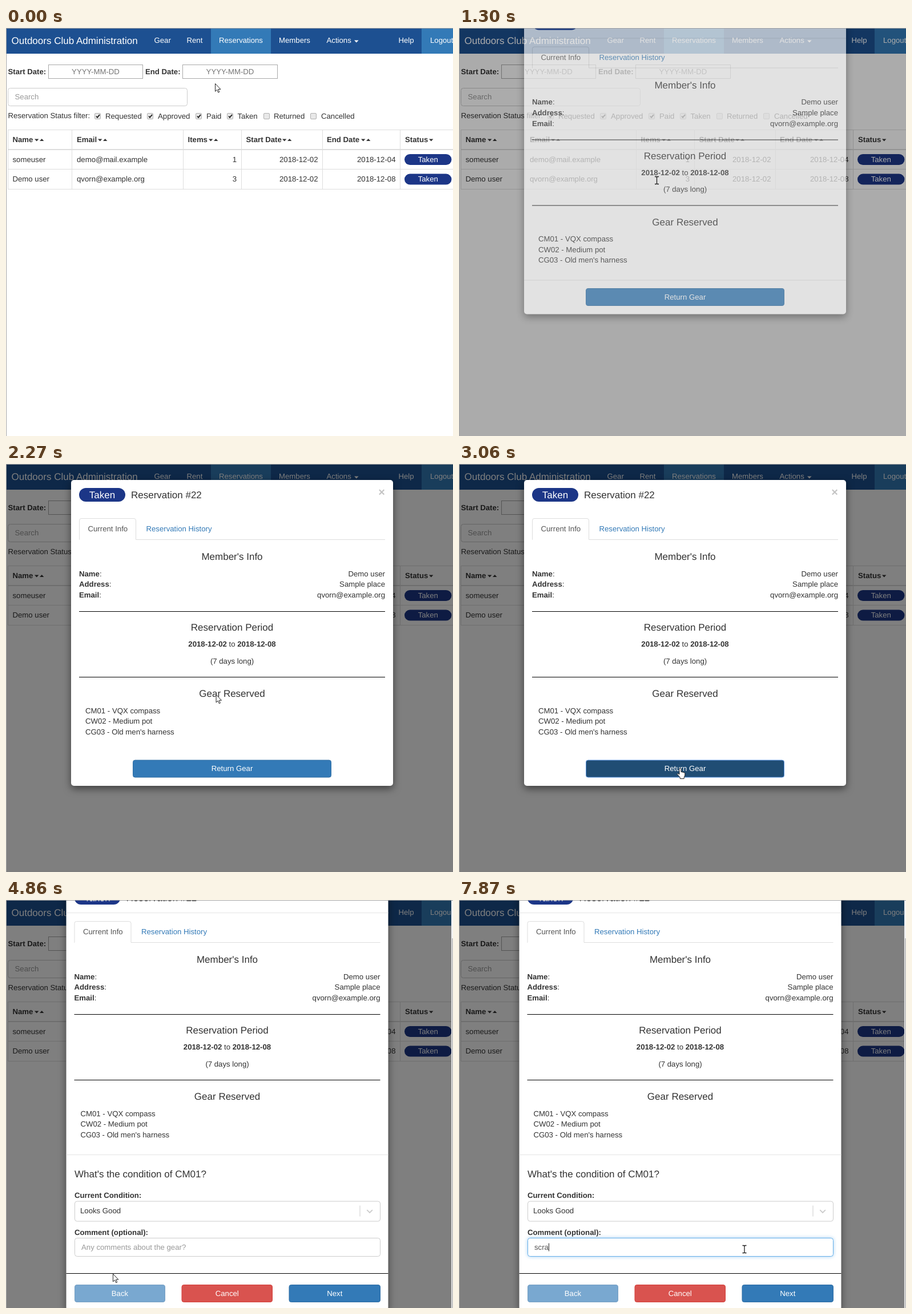
Write an HTML page that moves like this. It is 783 px wide and 715 px high and loops after 8000 ms.

```html
<!DOCTYPE html>
<html lang="en">
<head>
<meta charset="utf-8">
<title>Reservations</title>
<style>
html, body { margin: 0; width: 100%; height: 100%; overflow: hidden; background: #fff; }
svg { display: block; width: 783px; height: 715px; }
text { font: 13.2px "Liberation Sans", Arial, sans-serif; fill: #333; text-rendering: geometricPrecision; white-space: pre; }
.b { font-weight: bold; }
.m { text-anchor: middle; }
.e { text-anchor: end; }
.big { font-size: 17px; }
.w { fill: #fff; }
.hint { fill: #999; }
.date { fill: #757575; }
.tab { fill: #555; }
.link { fill: #337ab7; }
.x { font-size: 20px; font-weight: bold; fill: #c4c4c4; }
.pill { fill: #1c3687; }
.sheet { fill: #fff; filter: drop-shadow(0 5px 7px rgba(0,0,0,.5)); }
.focus { stroke: #66afe9; filter: drop-shadow(0 0 3px rgba(102,175,233,.6)); }
</style>
</head>
<body>
<svg id="stage" viewBox="0 0 783 715"></svg>
<script>
const text = (x, y, s, cls = '') => `<text x="${x}" y="${y}" class="${cls}">${s}</text>`;
const box = (x, y, w, h, fill, extra = '') =>
  `<rect x="${x}" y="${y}" width="${w}" height="${h}" fill="${fill}" ${extra}/>`;
const field = (x, y, w, h, stroke, r = 0, extra = '', fill = '#fff') =>
  box(x, y, w, h, fill, `stroke="${stroke}" rx="${r}" ${extra}`);
const path = (d, stroke, extra = '') => `<path d="${d}" fill="none" stroke="${stroke}" ${extra}/>`;
const button = (id, x, y, w, fill, edge, label, extra = '') =>
  `<g ${extra}>${box(x + .5, y + .5, w - 1, 30, fill, `stroke="${edge}" rx="3.5" id="${id}"`)}` +
  text(x + w / 2, y + 19.6, label, 'w m') + '</g>';
const down = (x, y) => `<path d="M${x} ${y}h7.4l-3.7 3.9z" fill="#333"/>`;
const up = (x, y) => `<path d="M${x} ${y + 3.9}h7.4l-3.7-3.9z" fill="#333"/>`;
const pill = (x, y, w, h, base, cls) =>
  box(x, y, w, h, '', `rx="${h / 2}" class="pill"`) + text(x + w / 2, base, 'Taken', 'w m ' + cls);

function navbar() {
  const items = [[259.5, 'Gear'], [316.5, 'Rent'], [373, 'Reservations'], [478, 'Members'],
    [561.5, 'Actions'], [687.5, 'Help'], [743, 'Logout']];
  return box(0, 0, 783, 45, '#1d5091') + box(359, 0, 105, 45, '#337ab7') + box(728, 0, 55, 45, '#337ab7') +
    text(9.5, 27.5, 'Outdoors Club Administration', 'w big') +
    items.map(([x, s]) => text(x, 26, s, 'w')).join('') +
    '<path d="M610 21.5h7.6l-3.8 3.9z" fill="#fff"/>';
}

function filters() {
  const boxes = [[155, 'Requested', 174], [247, 'Approved', 266], [332, 'Paid', 351],
    [387, 'Taken', 405.5], [451, 'Returned', 469], [533, 'Cancelled', 552]];
  return text(3.5, 80.5, 'Start Date:', 'b') + field(74.5, 64.5, 165, 24, '#a9a9a9') + text(157, 80.5, 'YYYY-MM-DD', 'm date') +
    text(244, 80.5, 'End Date:', 'b') + field(309.5, 64.5, 166, 24, '#a9a9a9') + text(392.5, 80.5, 'YYYY-MM-DD', 'm date') +
    field(3.5, 105.5, 314, 31, '#ccc', 4) + text(15.5, 125, 'Search', 'hint') +
    text(3.5, 157.5, 'Reservation Status filter:') +
    boxes.map(([x, s, tx], i) => field(x + .5, 149.5, 10, 10, '#b0b0b0', 1.5, '', '#e8e8e8') +
      (i < 4 ? path(`M${x + 3} 154.5l2 2.3 4-5`, '#222', 'stroke-width="1.9"') : '') + text(tx, 158.5, s)).join('');
}

function table() {
  const heads = [[11.5, 'Name', 50], [124, 'Email', 161], [318.5, 'Items', 355],
    [420.5, 'Start Date', 484], [562, 'End Date', 622], [699, 'Status', 741]];
  const rows = [['someuser', 'demo@mail.example', 1, '2018-12-04'], ['Demo user', 'qvorn@example.org', 3, '2018-12-08']];
  return path('M3.5 282.5V178.5H783M3.5 247.5H783M3.5 282.5H783M115.5 178V282M310.5 178V282M412.5 178V282M554.5 178V282M690.5 178V282', '#ddd') +
    path('M3 213H783', '#ddd', 'stroke-width="2"') +
    heads.map(([x, s, c]) => text(x, 199.6, s, 'b') + down(c, 194.5) + (c < 700 ? up(c + 9, 194) : '')).join('') +
    rows.map(([name, mail, n, end], i) => {
      const y = 234.7 + i * 34.6;
      return text(11.5, y, name) + text(124, y, mail) + text(404, y, n, 'e') + text(546.5, y, '2018-12-02', 'e') +
        text(682.5, y, end, 'e') + pill(698, y - 13.7, 82.5, 19, y, '');
    }).join('');
}

function details() {
  const info = [['Name', 'Demo user'], ['Address', 'Sample place'], ['Email', 'qvorn@example.org']];
  const gear = ['CM01 - VQX compass', 'CW02 - Medium pot', "CG03 - Old men's harness"];
  return pill(128, 42, 81, 24, 59.8, 'big') + text(219, 59.8, 'Reservation #22', 'big') + text(658, 56, '×', 'x m') +
    path('M128 132.5h.5V99q0-3.5 3.5-3.5h92q3.5 0 3.5 3.5v33.5H664', '#ddd') +
    text(143.5, 118, 'Current Info', 'tab') + text(245.5, 118, 'Reservation History', 'link') +
    text(396, 168.3, "Member's Info", 'big m') +
    info.map(([k, v], i) => text(128, 196.8 + i * 18.6, `<tspan class="b">${k}</tspan>:`) +
      text(664, 196.8 + i * 18.6, v, 'e')).join('') +
    path('M128 258.5H664M128 373.5H664', '#000') +
    text(396, 292.4, 'Reservation Period', 'big m') +
    text(396, 320, '<tspan class="b">2018-12-02</tspan> to <tspan class="b">2018-12-08</tspan>', 'm') +
    text(396, 349.5, '(7 days long)', 'm') + text(396, 408, 'Gear Reserved', 'big m') +
    gear.map((s, i) => text(139, 436.8 + i * 18.5, s)).join('');
}

function survey() {
  return text(128.5, 543.5, "What's the condition of CM01?", 'big') +
    text(128.5, 580.3, 'Current Condition:', 'b') + field(129, 586, 535, 35, '#ccc', 4) + text(138.5, 607.2, 'Looks Good') +
    path('M628.5 593.5v19', '#ccc') + path('M640.8 601.2l4.8 4.8 4.8-4.8', '#ccc', 'stroke-width="1.9"') +
    text(128.5, 644.5, 'Comment (optional):', 'b') + field(129, 650.5, 535, 32, '#ccc', 4, 'id="comment"') +
    '<text id="typed" x="140.5" y="670.6"></text>' + box(0, 659.5, 1, 14, '#222', 'id="caret"') +
    path('M114 712.5H678', '#000') +
    button('back', 128.5, 732, 159, '#337ab7', '#2e6da4', 'Back', 'opacity=".65"') +
    button('cancel', 316, 732, 159.5, '#d9534f', '#d43f3a', 'Cancel') +
    button('next', 504, 732, 160.5, '#337ab7', '#2e6da4', 'Next');
}

const pointers = `
  <path id="arrow" d="M.5.5v13.6l3.1-2.9 2.2 4.8 2-.9-2.1-4.7h4.2z" fill="#fff" stroke="#222"/>
  <g id="beam">${path('M-3.5-6.5h2.5l1 1 1-1h2.5M0-5.5V5.5M-3.5 6.5h2.5l1-1 1 1h2.5', '#222', 'stroke-width="1.3"')}</g>
  <path id="hand" d="M-1.5 1q1.5-2 3 0v5.5l5 1q2 .6 2 2.5-.2 4-1.8 6v2.5h-7V16q-2-2-5-5.5.5-2.3 3.8.5z" fill="#fff" stroke="#222"/>`;

document.getElementById('stage').innerHTML =
  navbar() + filters() + table() +
  box(0, 0, 783, 715, '#000', 'id="shade"') +
  `<g id="modal">${box(114, 28, 564, 536, '', 'rx="5" class="sheet" id="sheet"')}${details()}
    ${path('M114 80.5H678M114 504.5H678', '#e5e5e5', 'id="rules"')}
    <g id="foot">${button('give', 222, 518.5, 348, '#337ab7', '#2e6da4', 'Return Gear')}</g>
    <g id="survey">${survey()}</g></g>` +
  `<g id="bar">${box(780, 0, 3, 715, '#f1f1f1')}${box(781, 0, 2, 666, '#c1c1c1', 'id="thumb"')}</g>` +
  path('M0 .5H783M.5 0V715', '#a6a6a6') + `<g id="pointer">${pointers}</g>`;

const el = {};
document.querySelectorAll('[id]').forEach(n => { el[n.id] = n; });
const show = (n, on) => n.setAttribute('visibility', on ? 'inherit' : 'hidden');
const set = (n, o) => { for (const k in o) n.setAttribute(k, o[k]); };

// last entry whose time has passed
const at = (list, t) => list.filter(k => k[0] <= t).pop();

const OPENING = [[0, 0, -134], [1300, .66, -62.5], [1420, 1, -7.5], [1580, 1, 0]];
const SCROLL = [[0, 0], [4040, 3.5], [4170, 40], [4310, 58]];
const TYPING = [[0, ''], [7060, 's'], [7590, 'sc'], [7870, 'scra']];
const ROUTE = [[0, 365.5, 97], [130, 365, 106], [910, 346, 267], [1580, 346, 267], [2930, 387, 533], [3060, 387, 533],
  [3210, 384, 531], [3720, 384, 531], [3730, 378, 531], [4310, 378, 531], [5010, 135, 688], [5700, 590, 688],
  [6010, 498.5, 614], [6160, 498.5, 614], [6170, 499.5, 612], [8000, 499.5, 612]];

function place(t) {
  const i = ROUTE.findIndex(k => k[0] > t), [t0, x0, y0] = ROUTE[i - 1], [t1, x1, y1] = ROUTE[i];
  const p = (t - t0) / (t1 - t0), s = p * p * (3 - 2 * p);
  return [x0 + (x1 - x0) * s, y0 + (y1 - y0) * s];
}

function draw(t) {
  const [, fade, slide] = at(OPENING, t), scroll = at(SCROLL, t)[1], typed = at(TYPING, t)[1];
  const wide = t >= 3210, focus = t >= 6290;
  const held = Math.floor((t + 12) / 133.4) * 133.4;
  const [x, y] = place(t >= 6020 || (t >= 3000 && t < 4310) ? t : held);

  set(el.shade, { opacity: fade / 2 });
  set(el.modal, { opacity: fade, transform: `translate(${wide ? -8.5 : 0} ${slide - scroll})` });
  show(el.modal, fade > 0);
  set(el.sheet, { height: wide ? 749 : 536 });
  show(el.rules, t < 1420 || wide);
  show(el.foot, !wide);
  show(el.survey, wide);
  show(el.bar, wide);
  set(el.thumb, { y: 13.8 + scroll * .92 });

  const over = !wide && y > 518, press = t >= 3060;
  set(el.give, press ? { fill: '#204d74', stroke: '#5b95e0' } :
    over ? { fill: '#286090', stroke: '#204d74' } : { fill: '#337ab7', stroke: '#2e6da4' });
  const low = y > 674;
  set(el.cancel, { fill: low && x > 307 && x < 467 ? '#c9302c' : '#d9534f' });
  set(el.next, { fill: low && x > 495 ? '#286090' : '#337ab7' });

  set(el.comment, { class: focus ? 'focus' : '' });
  el.typed.textContent = typed || 'Any comments about the gear?';
  set(el.typed, { class: typed ? 'tab' : 'hint' });
  set(el.caret, { x: 140.5 + (typed ? el.typed.getComputedTextLength() : 0) });
  show(el.caret, focus && !(t >= 6760 && t < 7060));

  const hand = over || (t >= 3210 && t < 3730);
  const beam = (y > 256 && t < 1700) || t >= 6000;
  set(el.pointer, { transform: `translate(${x + .5} ${y})` });
  show(el.hand, hand);
  show(el.beam, beam);
  show(el.arrow, !hand && !beam);
}

const start = performance.now();
function tick() {
  draw((performance.now() - start) % 8000);
  requestAnimationFrame(tick);
}
tick();
</script>
</body>
</html>
```
